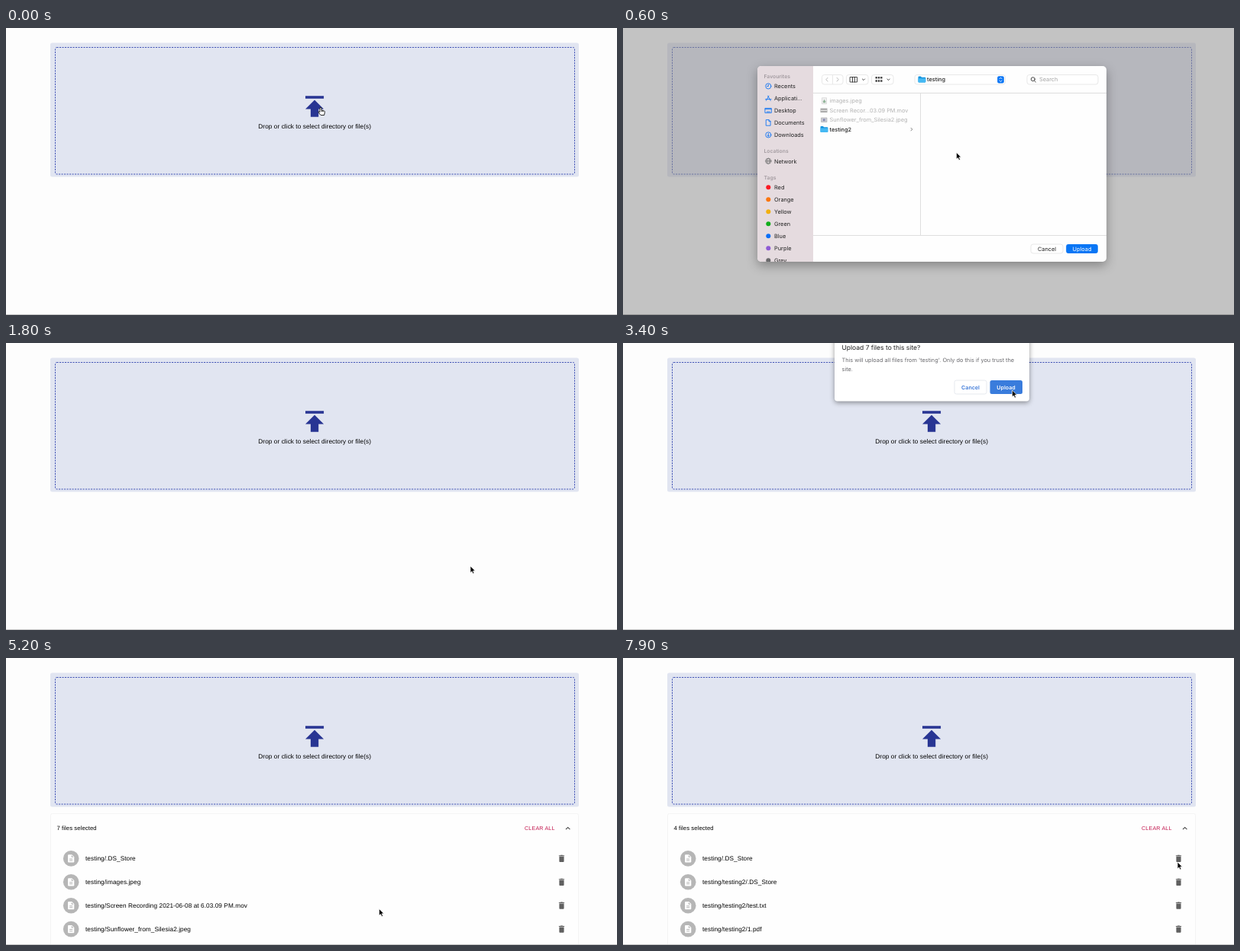
Recreate the animation shown at these times as an HTML page. Size 800 by 377 pixels, loop 8000 ms.

```html
<!DOCTYPE html>
<html lang="en">
<head>
<meta charset="utf-8">
<title>Directory upload</title>
<style>
  html, body { margin: 0; width: 100%; height: 100%; overflow: hidden; background: #fdfdfd; }
  svg { display: block; text-rendering: geometricPrecision; }
  .page { font: 8.23px "Liberation Sans", Arial, sans-serif; letter-spacing: .0094em; }
  .ui { font: 7.35px Inter, sans-serif; fill: #222; }
  .mid { text-anchor: middle; }
  .heading { font-size: 6.8px; font-weight: 600; fill: #a39ba0; }
  .dim { fill: #b3b3b3; }
  .line { fill: none; stroke: #333; stroke-width: .9; stroke-linecap: round; stroke-linejoin: round; }
  .blue { stroke: #1677f2; }
  .grey { stroke: #777; }
  .pale { stroke: #b5b5b5; }
  .button { fill: #fff; stroke: #e2e2e2; stroke-width: .8; }
  .accent { fill: #0a76f5; }
  .on-accent { fill: #fff; }
  .steps { stroke: #fff; }
  .inactive .accent { fill: #fff; stroke: #e2e2e2; stroke-width: .8; }
  .inactive .on-accent { fill: #222; }
  .inactive .steps { stroke: #333; }
  .inactive #stepper { stroke: none; }
  .window { filter: drop-shadow(0 5px 7px rgba(0, 0, 0, .32)); }
  #prompt { filter: drop-shadow(0 2px 3px rgba(0, 0, 0, .4)); }
</style>
</head>
<body>
<svg width="100%" height="100%" viewBox="0 0 800 377" preserveAspectRatio="none">
  <defs>
    <clipPath id="windowShape"><rect x="176" y="50" width="457" height="257" rx="5"/></clipPath>
    <path id="file" d="M14 2H6c-1.1 0-2 .9-2 2v16c0 1.1.9 2 2 2h12c1.1 0 2-.9 2-2V8l-6-6zm2 16H8v-2h8v2zm0-4H8v-2h8v2zm-3-5V3.5L18.5 9H13z"/>
    <path id="trash" d="M6 19c0 1.1.9 2 2 2h8c1.1 0 2-.9 2-2V7H6v12zM19 4h-3.5l-1-1h-5l-1 1H5v2h14V4z"/>
    <g id="folder">
      <path d="M0 1q0-1 1-1h2.5l1 1.2H9q.8 0 .8.8V7q0 1-1 1H1Q0 8 0 7Z" fill="#1593dd"/>
      <path d="M0 2.6H9.8V7q0 1-1 1H1Q0 8 0 7Z" fill="#45b9f3"/>
    </g>
    <path id="caret" class="line" d="M-1.6-.8 0 .8 1.6-.8"/>
  </defs>

  <rect width="800" height="377" fill="#fdfdfd"/>
  <g id="dropzone" class="page">
    <rect x="58" y="19.5" width="692" height="176" rx="2.5" fill="#e1e5f1"/>
    <rect x="64.5" y="25.5" width="680" height="166.5" rx="2" fill="none" stroke="#3f51b5" stroke-dasharray="2.1 1.4"/>
    <path transform="translate(383.4 82.4) scale(1.72)" fill="#283593" d="M5 4v2h14V4H5zm0 10h4v6h6v-6h4l-7-7-7 7z"/>
    <text x="404.2" y="132.2" class="mid">Drop or click to select directory or file(s)</text>
  </g>

  <g id="panel" class="page">
    <rect id="card" x="58.5" y="204.5" width="691" rx="2" fill="#fefefe" stroke="#f4f4f4"/>
    <text id="count" x="66.5" y="226.4" font-size="7.7"></text>
    <text x="679" y="226" font-size="7.1" letter-spacing=".2" fill="#c2184f">CLEAR ALL</text>
    <path id="chevron" fill="#444" d="M4.6-3.4 0 1.2-4.6-3.4-6-2 0 4 6-2z"/>
    <svg id="list" x="58" y="243" width="692"></svg>
  </g>

  <path d="M0 376.5H800" stroke="#c6c6c6"/>
  <rect id="shade" width="800" height="377"/>

  <g id="dialog" class="ui">
    <g class="window">
      <g clip-path="url(#windowShape)">
        <rect x="176" y="50" width="457" height="257" fill="#fefefe"/>
        <rect x="176" y="50" width="73" height="257" fill="#e5dbdf"/>
        <path d="M249 85.5H633M389.5 86V272M249 272.5H633" stroke="#dedede"/>
        <g id="sidebar"></g>
        <g id="files"></g>

        <rect class="button" x="260.5" y="61.5" width="27.5" height="12.5" rx="3"/>
        <path d="M274.5 62V74" stroke="#e2e2e2" stroke-width=".8"/>
        <path class="line pale" d="M268 65.3 265.8 67.7 268 70.1M280 65.3 282.2 67.7 280 70.1"/>
        <rect class="button" x="292.5" y="61.5" width="28.5" height="12.5" rx="3"/>
        <path class="line" d="M297.5 64.5h9v6.5h-9zM300.5 64.5v6.5M303.5 64.5v6.5"/>
        <use href="#caret" x="315" y="67.8"/>
        <rect class="button" x="325.5" y="61.5" width="28.5" height="12.5" rx="3"/>
        <path d="M330.5 65.2h9M330.5 69.5h9" stroke="#444" stroke-width="2.6" stroke-dasharray="2.4 .9"/>
        <use href="#caret" x="347.5" y="67.8"/>
        <rect class="button" x="382" y="61.5" width="118.5" height="12.5" rx="3"/>
        <use href="#folder" x="386.5" y="63.6"/>
        <text x="398" y="70.2" font-weight="500">testing</text>
        <rect id="stepper" class="accent" x="490.2" y="63.2" width="8.6" height="9.2" rx="2"/>
        <path class="line steps" d="M493 66.7 494.5 65.2 496 66.7M493 69 494.5 70.5 496 69"/>
        <rect class="button" x="529" y="61.5" width="93" height="12.5" rx="3"/>
        <path class="line" d="M538.6 69.2 540.4 71"/>
        <circle class="line" cx="536.8" cy="67.2" r="2.5"/>
        <text x="545" y="70.2" fill="#a5a5a5">Search</text>

        <rect class="button" x="534" y="284" width="42" height="12" rx="3"/>
        <text class="mid" x="555" y="292.6">Cancel</text>
        <rect class="accent" x="580.2" y="284" width="41.6" height="12" rx="3"/>
        <text class="mid on-accent" x="601" y="292.6">Upload</text>
      </g>
    </g>
  </g>

  <g id="prompt" class="ui">
    <rect x="277" y="-10" width="255" height="86.5" rx="4" fill="#fff"/>
    <text x="286.5" y="8.6" font-size="8.5">Upload 7 files to this site?</text>
    <g fill="#6a6a6e">
      <text x="286.5" y="25.3">This will upload all files from 'testing'. Only do this if you trust the</text>
      <text x="286.5" y="36.8">site.</text>
    </g>
    <rect x="434" y="49" width="42" height="18" rx="2.5" fill="#fff" stroke="#e0e4ea" stroke-width=".8"/>
    <rect id="confirm" x="480.5" y="49" width="42.5" height="18" rx="2.5"/>
    <g class="mid" font-size="7.1" font-weight="600">
      <text x="455" y="60.6" fill="#3b78d8">Cancel</text>
      <text x="501.5" y="60.6" fill="#fff">Upload</text>
    </g>
  </g>

  <g id="cursor">
    <path id="arrow" d="M0 0V8.8L2 7 3.4 10.1 5 9.4 3.6 6.3H6.3Z" stroke="#fff" stroke-width=".7"/>
    <path id="hand" fill="#fff" stroke="#111" stroke-width=".9" stroke-linejoin="round"
      d="M-1 1Q0-.7 1 1V4L4.8 5Q5.6 5.3 5.4 6.6L4.6 10.5H.2L-3 6.8Q-3.2 5.5-2 5.7L-1 6.6ZM1.3 4.2V6M3.1 4.7V6.2"/>
  </g>
</svg>

<script>
const LOOP = 8000;
const $ = id => document.getElementById(id);
const clamp = v => Math.max(0, Math.min(1, v));
const ease = p => p * p * (3 - 2 * p);
const ramp = (t, from, to) => ease(clamp((t - from) / (to - from)));
const within = (t, from, to) => t >= from && t < to;
const show = (id, visible) => $(id).setAttribute('visibility', visible ? 'visible' : 'hidden');

// Sidebar
const places = [
  ['Recents', '<circle r="3.6"/><path d="M0-2.2V.2H-1.8"/>'],
  ['Applicati...', '<path d="M-2.9 3 .6-3.2M2.9 3-.6-3.2M-3.8 1.2H3.8"/>'],
  ['Desktop', '<path d="M-4-3H4V3H-4ZM-4-1.8H4M-2 1.6H2"/>'],
  ['Documents', '<path d="M-2.7-3.8H.7L2.8-1.7V3.8H-2.7ZM.7-3.8V-1.7H2.8"/>'],
  ['Downloads', '<circle r="3.6"/><path d="M0-1.9V1.8M-1.5.4 0 1.9 1.5.4"/>']
];
const globe = '<circle r="3.6"/><ellipse rx="1.6" ry="3.6"/><path d="M-3.6 0H3.6"/>';
const tags = { Red: '#fb1a25', Orange: '#fb760c', Yellow: '#f2b010', Green: '#12ad1c',
  Blue: '#0a6ff7', Purple: '#8f5bd5', Grey: '#6a6a6c' };

const heading = (label, y) => `<text class="heading" x="184.5" y="${y + 2.4}">${label}</text>`;
const place = (label, icon, y, tone) => `<text x="198" y="${y + 2.7}">${label}</text>
  <g class="line ${tone}" transform="translate(190.3 ${y})">${icon}</g>`;
const tag = ([label, color], i) => `<circle cx="190.3" cy="${209.2 + 16 * i}" r="3" fill="${color}"/>
  <text x="198" y="${211.8 + 16 * i}">${label}</text>`;

$('sidebar').innerHTML = heading('Favourites', 63.5)
  + places.map(([label, icon], i) => place(label, icon, 76.4 + 16 * i, 'blue')).join('')
  + heading('Locations', 162) + place('Network', globe, 174.8, 'grey')
  + heading('Tags', 196.3) + Object.entries(tags).map(tag).join('');

// Directory column
const disabledFiles = [
  ['images.jpeg', '<path d="M260.5-4h6v8h-6z" fill="#f0f0f0" stroke="#ccc" stroke-width=".6"/><path d="M262 2.5h3.2V.5L263.6-2 262 .5Z" fill="#93b59a"/>'],
  ['Screen Recor...03.09 PM.mov', '<path d="M258.5-2.8h9v5.6h-9z" fill="#aaa"/><path d="M259 .2h8" stroke="#eee"/>'],
  ['Sunflower_from_Silesia2.jpeg', '<path d="M259.5-2.8h7.5v5.6h-7.5z" fill="#c9cad4" stroke="#aaa" stroke-width=".6"/><circle cx="263.2" r="1.5" fill="#8388ad"/>']
];
$('files').innerHTML = disabledFiles.map(([name, icon], i) =>
  `<g transform="translate(0 ${95.7 + 12.5 * i})">${icon}<text class="dim" x="270.5" y="2.6">${name}</text></g>`).join('')
  + `<use href="#folder" x="258.5" y="129"/><text x="270.5" y="135.8" font-weight="500">testing2</text>
     <path class="line grey" stroke-width=".7" d="M377 131.3 378.8 133.1 377 134.9"/>`;

// Selected files
const selected = ['.DS_Store', 'images.jpeg', 'Screen Recording 2021-06-08 at 6.03.09 PM.mov',
  'Sunflower_from_Silesia2.jpeg', 'testing2/.DS_Store', 'testing2/test.txt', 'testing2/1.pdf'];
const deletions = [6300, 6600, 6900];
const row = (name, i) => `<g transform="translate(0 ${20.4 + 30.9 * i})">
  <circle cx="27.2" r="10.3" fill="#b6b6b6"/>
  <use href="#file" fill="#fff" transform="translate(21 -6.2) scale(.515)"/>
  <text x="46" y="2.8">testing/${name}</text>
  <use href="#trash" fill="#606060" transform="translate(663.3 -6.2) scale(.515)"/></g>`;
let shownDeletions = -1;

function renderList(deleted) {
  if (deleted === shownDeletions) return;
  shownDeletions = deleted;
  const rest = selected.filter((_, i) => i < 1 || i > deleted);
  $('count').textContent = `${rest.length} files selected`;
  $('list').innerHTML = rest.map(row).join('');
}

// Pointer stops: time, x, y
const stops = [
  [0, 412, 104], [150, 412, 104], [550, 436.5, 163.5], [1000, 436.5, 163.5],
  [1450, 608, 293], [1900, 608, 293], [2700, 509.5, 62], [3700, 509.5, 62],
  [4200, 620, 262], [4600, 734, 217], [4920, 734, 217], [5200, 488.5, 329.5],
  [5500, 488.5, 329.5], [6000, 727, 295], [6920, 727, 295], [7050, 726, 268], [LOOP, 726, 268]
];
const handTimes = [[0, 250], [1450, 1700], [4700, 4980], [6000, 7200]];

function pointerAt(t) {
  const next = stops.findIndex(stop => stop[0] > t);
  const [t0, x0, y0] = stops[next - 1], [t1, x1, y1] = stops[next];
  const p = ramp(t, t0, t1);
  return [x0 + (x1 - x0) * p, y0 + (y1 - y0) * p];
}

function draw(t) {
  const closing = ramp(t, 1525, 1755);
  const open = ramp(t, 250, 480) * (1 - closing);
  $('dialog').setAttribute('opacity', open);
  $('dialog').setAttribute('transform', `translate(0 ${-18 * (1 - open)})`);
  $('dialog').classList.toggle('inactive', t >= 1525);
  $('shade').setAttribute('opacity', .23 * open);
  $('dropzone').setAttribute('opacity', 1 - .4 * (t < 1525 ? open : 0));

  $('prompt').setAttribute('opacity', ramp(t, 2050, 2250) * (1 - ramp(t, 3450, 3600)));
  $('confirm').setAttribute('fill', t < 2700 ? '#1a73e8' : '#397cdc');

  const expanded = ramp(t, 4880, 5200);
  const listHeight = 222 * expanded;
  show('panel', t >= 3600);
  $('card').setAttribute('height', 38.5 + listHeight);
  $('list').setAttribute('height', listHeight);
  $('chevron').setAttribute('transform', `translate(735.7 223.8) rotate(${180 * expanded}) scale(.515)`);
  renderList(deletions.filter(time => t >= time).length);

  const hand = handTimes.some(([from, to]) => within(t, from, to));
  show('hand', hand);
  show('arrow', !hand);
  $('cursor').setAttribute('transform', `translate(${pointerAt(t)})`);
}

const start = performance.now();
function frame() {
  draw((performance.now() - start) % LOOP);
  requestAnimationFrame(frame);
}
frame();
</script>
</body>
</html>
```
